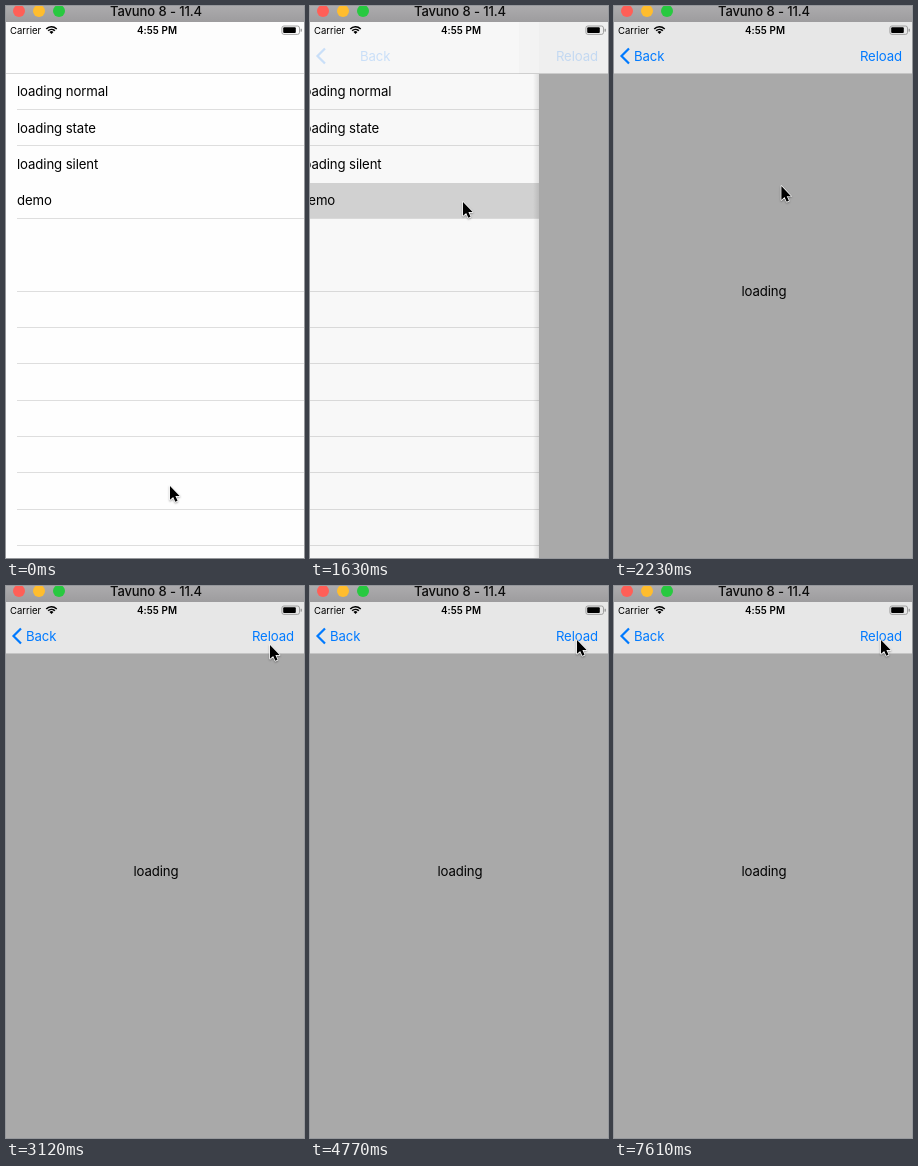
These frames come from a looping animation (298x552 px, 8 s). An HTML page with a canvas:

```html
<!DOCTYPE html>
<html lang="en">
<head>
<meta charset="utf-8">
<title>Loading demo</title>
<style>
html, body { margin: 0; width: 100%; height: 100%; overflow: hidden; background: #fff; }
canvas { display: block; width: 298px; height: 552px; }
</style>
</head>
<body>
<canvas id="stage"></canvas>
<script>
const W = 298, H = 552, LOOP = 8000, BAR = 16, TOP = 68, ROW = 36.36;
const BLUE = '#007aff';
const ROWS = ['loading normal', 'loading state', 'loading silent', 'demo'];
const canvas = document.getElementById('stage');
const ctx = canvas.getContext('2d');
const ratio = window.devicePixelRatio || 1;
canvas.width = W * ratio;
canvas.height = H * ratio;

const lerp = (a, b, p) => a + (b - a) * p;
const smooth = p => p * p * (3 - 2 * p);
const clamp = p => Math.max(0, Math.min(1, p));
const gray = v => { const n = Math.round(v); return `rgb(${n},${n},${n})`; };

// Number of updates done so far out of n, evenly spread from a to b
function steps(t, a, b, n) {
  return t < a ? 0 : Math.min(n, 1 + Math.floor((t - a) / (b - a) * (n - 1) + 0.01));
}

function rect(x, y, w, h, fill) {
  ctx.fillStyle = fill;
  ctx.fillRect(x, y, w, h);
}

function text(str, x, y, { size = 13.2, weight = 400, color = '#000', align = 'left', alpha = 1, track = -0.1 } = {}) {
  ctx.globalAlpha = alpha;
  ctx.font = `${weight} ${size}px Inter, Roboto, sans-serif`;
  ctx.letterSpacing = track + 'px';
  ctx.textAlign = align;
  ctx.fillStyle = color;
  ctx.fillText(str, x, y);
  ctx.globalAlpha = 1;
}

function line(points, width, color, alpha = 1) {
  ctx.globalAlpha = alpha;
  ctx.strokeStyle = color;
  ctx.lineWidth = width;
  ctx.beginPath();
  points.forEach(([x, y]) => ctx.lineTo(x, y));
  ctx.stroke();
  ctx.globalAlpha = 1;
}

function titleBar() {
  const g = ctx.createLinearGradient(0, 0, 0, BAR);
  g.addColorStop(0, '#acabad');
  g.addColorStop(1, '#9d9c9e');
  rect(0, 0, W, BAR, g);
  ['#ff5f57', '#ffbd2e', '#28c940'].forEach((c, i) => {
    ctx.fillStyle = c;
    ctx.beginPath();
    ctx.arc(13 + 20 * i, 5, 6, 0, 7);
    ctx.fill();
  });
  text('Tavuno 8 - 11.4', 150, 10, { color: '#0c0c0c', align: 'center', size: 13, weight: 500 });
}

function wifi(x, y) {
  ctx.strokeStyle = ctx.fillStyle = '#000';
  ctx.lineWidth = 1.5;
  for (const r of [4.6, 7.2]) {
    ctx.beginPath();
    ctx.arc(x, y, r, -Math.PI * 0.76, -Math.PI * 0.24);
    ctx.stroke();
  }
  ctx.beginPath();
  ctx.moveTo(x, y);
  ctx.arc(x, y, 2.8, -Math.PI * 0.76, -Math.PI * 0.24);
  ctx.fill();
}

function statusBar() {
  text('Carrier', 4, 27.5, { size: 9.5, track: 0 });
  wifi(45.5, 28);
  text('4:55 PM', 151, 27.5, { size: 9.8, weight: 600, align: 'center', track: 0.1 });
  ctx.strokeStyle = '#8e8e8e';
  ctx.lineWidth = 0.8;
  ctx.beginPath();
  ctx.roundRect(275.9, 20, 17.6, 8.4, 2);
  ctx.stroke();
  ctx.fillStyle = '#000';
  ctx.beginPath();
  ctx.roundRect(277.2, 21.3, 12.6, 5.8, 1);
  ctx.fill();
  rect(294.6, 22.8, 1.2, 2.8, '#8e8e8e');
}

function list(p, edge, selected) {
  ctx.save();
  ctx.beginPath();
  ctx.rect(0, TOP, edge, H - TOP);
  ctx.clip();
  const dx = -0.3 * W * p;
  rect(0, TOP, W, H - TOP, '#fefefe');
  if (selected) rect(dx, 177, W - dx, 36, gray(lerp(209, 230, p)));
  for (let n = 1; n < 14; n++) {
    if (n === 3 || n === 5) continue;
    rect(11 + dx, Math.floor(66.9 + ROW * n), W - dx, 1, '#dedede');
  }
  ROWS.forEach((s, i) => text(s, 11 + dx, 90.2 + ROW * i));
  if (p > 0) {
    rect(0, TOP, edge, H - TOP, `rgba(0,0,0,${0.11 * p})`);
    const g = ctx.createLinearGradient(edge - 6, 0, edge, 0);
    g.addColorStop(0, 'rgba(0,0,0,0)');
    g.addColorStop(1, `rgba(0,0,0,${0.14 * (1 - p)})`);
    rect(edge - 6, TOP, 6, H - TOP, g);
  }
  ctx.restore();
}

function navBar(p, edge, reload) {
  if (p === 0) rect(0, BAR, W, TOP - BAR, '#fdfdfd');
  else {
    const left = lerp(250, 239, p), right = lerp(241, 231, p), h = TOP - BAR;
    rect(0, BAR, W, h, gray(right));
    if (p < 1) {
      rect(0, BAR, edge, h, gray((left + right) / 2));
      rect(0, BAR, Math.max(0, edge - 20), h, gray(left));
    }
    const alpha = p ** 1.15;
    line([[15, 42.5], [7.5, 50], [15, 57.5]], 2.2, BLUE, alpha);
    text('Back', 20 + 39 * (1 - p), 54.6, { color: BLUE, alpha });
    text('Reload', 288, 54.6, { color: BLUE, alpha: alpha * reload, align: 'right' });
  }
  rect(0, 67, W, 1, 'rgba(0,0,0,.15)');
}

function pointer(x, y) {
  ctx.save();
  ctx.translate(x, y);
  ctx.scale(0.9, 0.9);
  ctx.beginPath();
  [[0, 0], [0, 15.4], [3.5, 12.1], [5.9, 17.5], [8.4, 16.4], [6, 11.2], [10.7, 11.2]]
    .forEach(([a, b]) => ctx.lineTo(a, b));
  ctx.closePath();
  ctx.shadowColor = 'rgba(0,0,0,.35)';
  ctx.shadowBlur = 2 * ratio;
  ctx.shadowOffsetY = ratio;
  ctx.lineWidth = 1.6;
  ctx.lineJoin = 'round';
  ctx.strokeStyle = '#fff';
  ctx.stroke();
  ctx.shadowColor = 'transparent';
  ctx.fillStyle = '#000';
  ctx.fill();
  ctx.restore();
}

function pointerAt(t, push) {
  const near = steps(t, 2820, 3570, 6);
  if (near > 3) return [264 + (near - 3), 59 - (near - 3) * 5 / 3];
  if (near > 0) {
    const p = 1 - (1 - near / 3) ** 2;
    return [lerp(245, 264, p), lerp(94, 59, p)];
  }
  if (push > 4) {
    const p = smooth((push - 4) / 4);
    return [lerp(153, 245, p), lerp(196, 94, p)];
  }
  const p = smooth(steps(t, 150, 590, 4) / 4);
  return [lerp(164, 153, p), lerp(480, 196, p)];
}

// Button opacity: dims when pressed, then fades back
function reloadAlpha(t) {
  if (t < 4770) {
    const k = steps(t, 4170, 4770, 5);
    return k ? clamp(0.25 + 0.25 * Math.max(0, k - 2)) : 1;
  }
  return [1, 0.25, 0.65, 1][steps(t, 7310, 7610, 3)];
}

function draw(t) {
  const push = steps(t, 1630, 2670, 8);
  const p = push > 3 ? 1 : [0, 0.231, 0.879, 0.985][push];
  const edge = Math.round(W * (1 - p));
  const done = (t >= 3870 && t < 4470) || (t >= 6570 && t < 7460);

  ctx.setTransform(ratio, 0, 0, ratio, 0, 0);
  rect(0, 0, W, H, '#a9a9a9');
  if (p < 1) list(p, edge, push > 0);
  if (p > 0 && !done) text('loading', 150 + edge, 289.8, { align: 'center' });
  navBar(p, edge, reloadAlpha(t));
  statusBar();
  titleBar();
  pointer(...pointerAt(t, push));
}

const start = performance.now();
function frame() {
  draw((performance.now() - start) % LOOP);
  requestAnimationFrame(frame);
}
frame();
</script>
</body>
</html>
```
